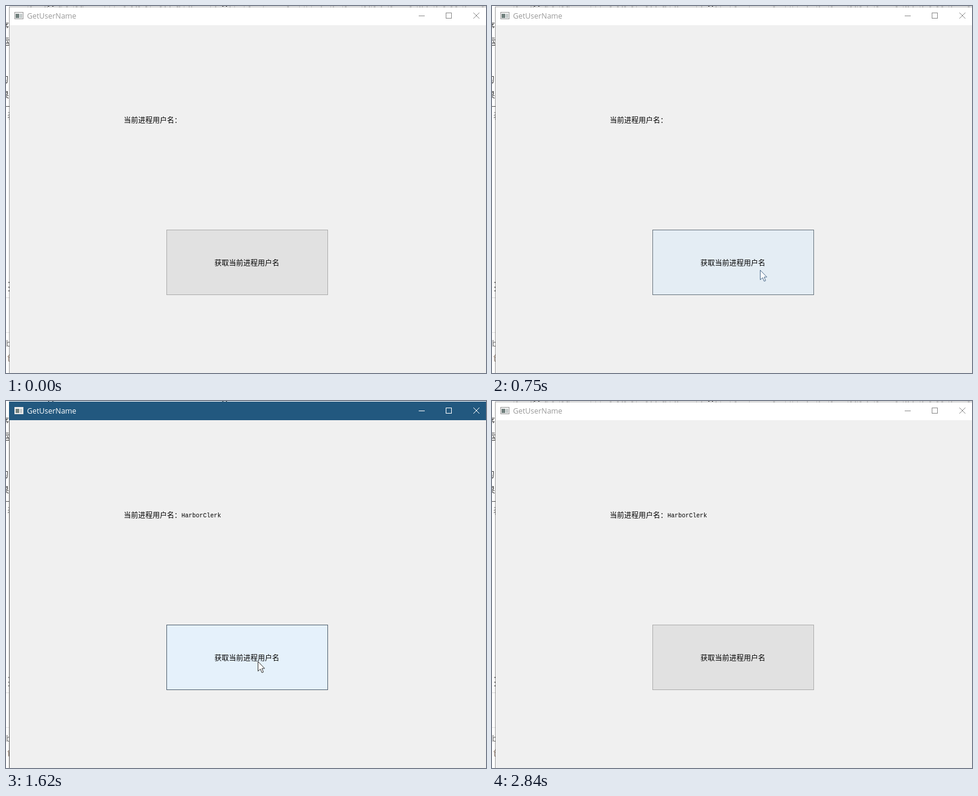
These frames come from a looping animation (799x612 px, 2.91 s). An HTML page with a canvas:

```html
<!DOCTYPE html>
<html lang="zh-CN">
<head>
<meta charset="utf-8">
<style>
html, body { margin: 0; width: 100%; height: 100%; overflow: hidden; background: #fff; }
canvas { display: block; }
</style>
</head>
<body>
<canvas id="stage" width="799" height="612"></canvas>
<script>
const ctx = document.getElementById('stage').getContext('2d');
const LOOP = 2910;
const CJK = '12px "Noto Sans CJK SC", "Noto Sans CJK", sans-serif';

// Runs of redraws: [first time, count, spacing]; the picture holds in between.
const RUNS = [[0, 1, 0], [330, 9, 70], [1280, 6, 68], [1820, 9, 70], [2840, 1, 0]];
// Pointer keys: [time, x, y]
const PATH = [
  [330, 730, 589], [540, 534, 478], [610, 498, 452], [820, 420, 434], [890, 419, 434],
  [1750, 419, 434], [1820, 440, 441], [1890, 530, 478], [2030, 713, 557],
  [2240, 740, 603], [2310, 748, 611]
];

const ramp = (t, from, length) => Math.min(1, Math.max(0, (t - from) / length));
const mix = (a, b, k) => a.map((v, i) => v + (b[i] - v) * k);
const rgb = c => `rgb(${c.map(Math.round)})`;

function rect(x, y, w, h, color) {
  ctx.fillStyle = color;
  ctx.fillRect(x, y, w, h);
}

function text(str, x, y, font, color) {
  ctx.font = font;
  ctx.fillStyle = color;
  ctx.fillText(str, x, y);
}

function line(color, ...pts) {
  ctx.strokeStyle = color;
  ctx.lineWidth = 1;
  ctx.beginPath();
  pts.forEach(([x, y]) => ctx.lineTo(x, y));
  ctx.stroke();
}

function hold(t) {
  let last = 0;
  for (const [start, count, gap] of RUNS)
    for (let i = 0; i < count; i++)
      if (start + i * gap <= t) last = start + i * gap;
  return last;
}

function pointer(t) {
  const i = PATH.findIndex(p => p[0] >= t);
  if (t < PATH[0][0] || i < 0) return null;
  if (i === 0) return PATH[0].slice(1);
  const a = PATH[i - 1], b = PATH[i];
  return mix(a, b, (t - a[0]) / (b[0] - a[0])).slice(1).map(Math.round);
}

// The page behind the window, seen only along its left and top edges
function backdrop() {
  rect(0, 0, 799, 612, '#fff');
  ctx.save();
  ctx.beginPath();
  ctx.rect(0, 0, 6, 612);
  ctx.clip();
  const font = '14px "Noto Sans CJK SC", "Noto Sans CJK", sans-serif';
  [['序', -9, 38], ['运', -8, 64], ['的', -10, 127], ['果', -9, 153]]
    .forEach(([s, x, y]) => text(s, x, y, font, '#333'));
  text('表', 2, 188, font, '#777');
  text('b', 0, 568, '14px "Noto Sans", sans-serif', '#777');
  text('创', 2, 591, font, '#8a7464');
  rect(0, 167, 6, 1, '#555');
  rect(0, 486, 6, 1, '#ddd');
  rect(0, 544, 6, 1, '#e4e4e4');
  [460, 468, 474].forEach(y => rect(4, y, 2, 2, '#777'));
  ctx.restore();
  [70, 77, 360, 366].forEach(x => rect(x, 0, 2, 1, '#555'));
}

function titleBar(active) {
  const ink = active ? '#fff' : '#999';
  if (active) {
    rect(5, 1, 794, 31, '#22587f');
    rect(5, 32, 1, 580, '#555');
  } else {
    rect(5, 1, 1, 611, 'rgba(0,0,0,.38)');
    rect(6, 1, 793, 1, '#aaa');
    let seed = 7;
    for (let x = 28; x < 796; x += 4) {
      seed = seed * 16807 % 2147483647;
      if (seed % 5 < 2) rect(x, 1, 1 + seed % 3, 1, '#686868');
    }
    rect(6, 2, 793, 30, '#fff');
  }
  rect(14, 10, 15, 12, active ? '#ddd' : '#999');
  rect(15, 11, 13, 10, '#f4f4f4');
  rect(16, 13, 6, 7, '#71807d');
  rect(23, 13, 4, 7, '#c3c9c9');
  text('GetUserName', 35, 21, '12.4px "Open Sans", "Noto Sans", sans-serif', ink);
  const mark = active ? '#fff' : '#8c8c8c';
  rect(687, 16, 10, 1, mark);
  ctx.strokeStyle = mark;
  ctx.strokeRect(732.5, 11.5, 9, 9);
  line(mark, [778, 11], [788, 21]);
  line(mark, [788, 11], [778, 21]);
}

function button(t) {
  const hover = ramp(t, 544, 280) * (1 - ramp(t, 1900, 280));
  const press = Math.min(ramp(t, 1224, 280), 0.68 * (1 - ramp(t, 1416, 204)));
  const face = mix(mix([225, 225, 225], [229, 241, 251], hover), [204, 228, 247], press);
  rect(267, 373, 269, 109, rgb(mix([173, 173, 173], [82, 98, 112], hover)));
  rect(268, 374, 267, 107, rgb(face));
  text('获取当前进程用户名', 347, 433, CJK, '#000');
}

function arrow(x, y, color) {
  ctx.save();
  ctx.translate(x + .5, y + .5);
  ctx.beginPath();
  [[0, 0], [0, 16], [4, 12.5], [6.5, 18.5], [9, 17.5], [6.5, 11.5], [11, 11.5]]
    .forEach(p => ctx.lineTo(...p));
  ctx.closePath();
  ctx.fillStyle = '#fff';
  ctx.fill();
  ctx.strokeStyle = color;
  ctx.stroke();
  ctx.restore();
}

function draw(t) {
  backdrop();
  titleBar(t >= 1280 && t < 2840);
  rect(6, 32, 793, 580, '#f0f0f0');
  text('当前进程用户名：', 196, 195, CJK, '#000');
  if (t >= 1416)
    text('HarborClerk', 292, 194, '10px "Liberation Mono", monospace', '#000');
  button(t);
  const tip = pointer(t);
  if (tip) arrow(...tip, t >= 890 && t < 1820 ? '#333' : '#4c6c8c');
}

let start;
function tick(now) {
  start ??= now;
  draw(hold((now - start) % LOOP));
  requestAnimationFrame(tick);
}
draw(0);
requestAnimationFrame(tick);
</script>
</body>
</html>
```
